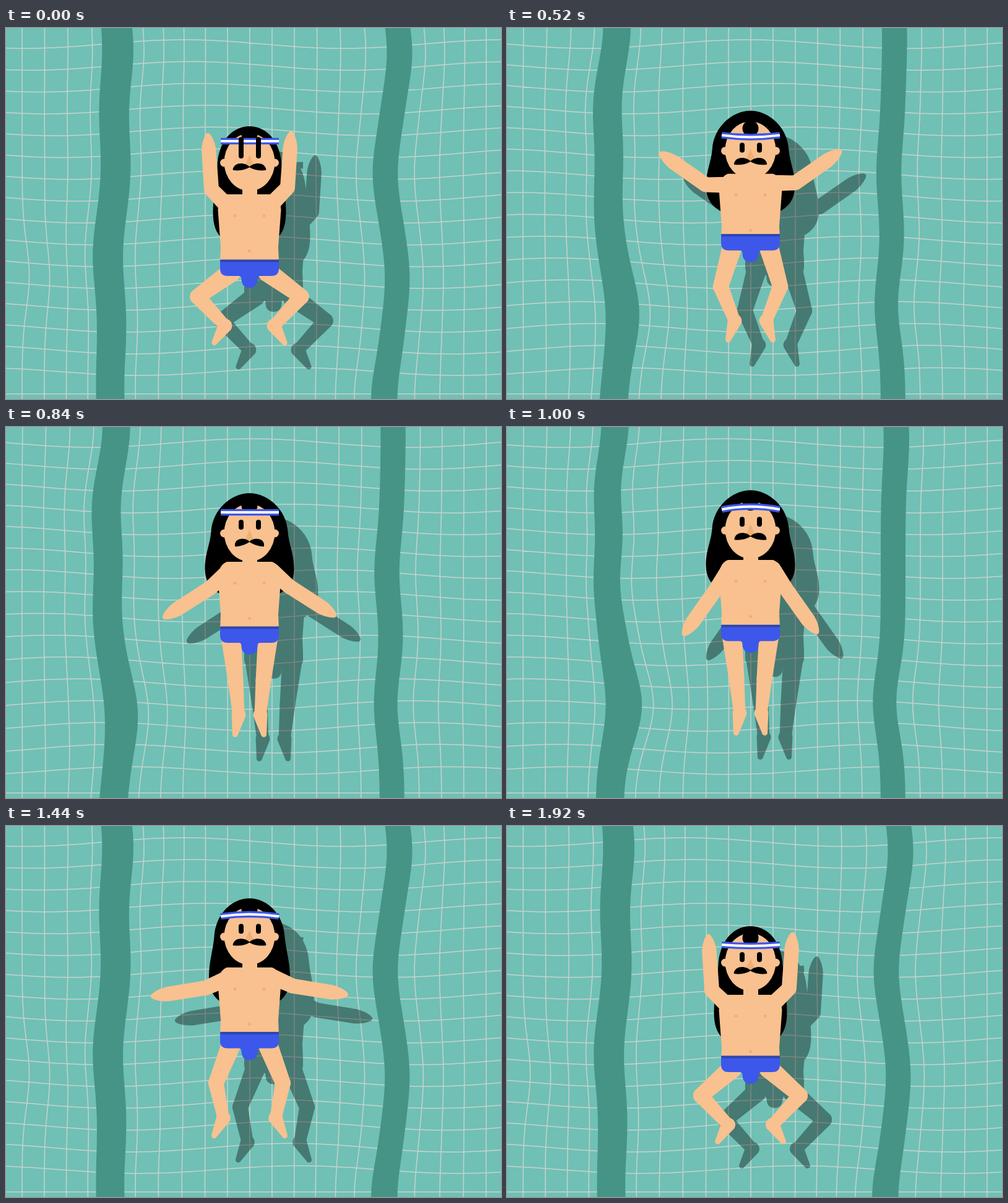
An HTML page with a canvas for the animation above (1.96 s loop, 800 by 600 pixels).

```html
<!DOCTYPE html>
<html>
<head>
<meta charset="utf-8">
<style>
html, body { margin: 0; width: 800px; height: 600px; overflow: hidden; background: #70c0b5; }
canvas { display: block; }
</style>
</head>
<body>
<canvas id="stage" width="800" height="600"></canvas>
<script>
const LOOP = 1960, STEP = 40, MID = 393.5, RAD = Math.PI / 180;
const SKIN = '#f8c18f', DARK_SKIN = '#eeb076', BLUE = '#3d57ea';
const stage = document.getElementById('stage').getContext('2d');
const layer = document.createElement('canvas');
layer.width = 800;
layer.height = 600;
const g = layer.getContext('2d');

// Key poses of the stroke: heights in pixels, limb directions in degrees
const times = [0, 360, 640, 840, 1240, 1640, 1920];
const keys = {
  shoulder: [269, 247, 228, 218, 213, 253, 273],
  waist: [375, 344, 328, 323, 318, 356, 372],
  face: [217, 210, 186, 171, 163, 201, 220],
  nod: [-14, -1, -8, -13, -13, -10, -8],
  spread: [0, 0.9, 1, 1, 1, 0, 0],
  sag: [0, 0, 5, 0, -9, 2, 2],
  arm: [-46, -27, 21, 42, 70, -30, -44],
  fore: [-86, -62, -9, 33, 73, -66, -86],
  thigh: [36, 58, 85, 96, 96, 41, 41],
  shin: [133, 122, 104, 95, 95, 114, 133],
  foot: [58, 66, 75, 80, 80, 45, 58]
};

// Smooth cyclic interpolation without overshoot
function ease(v, t) {
  const n = times.length;
  const at = i => times[(i + n) % n] + LOOP * Math.floor(i / n);
  const val = i => v[(i + n) % n];
  const slope = i => (val(i + 1) - val(i)) / (at(i + 1) - at(i));
  const tangent = i => {
    const a = slope(i - 1), b = slope(i);
    return a * b > 0 ? 2 * a * b / (a + b) : 0;
  };
  let i = n - 1;
  while (at(i) > t) i--;
  const h = at(i + 1) - at(i), s = (t - at(i)) / h, r = 1 - s;
  return val(i) * (1 + 2 * s) * r * r + tangent(i) * h * s * r * r
    + val(i + 1) * s * s * (3 - 2 * s) - tangent(i + 1) * h * s * s * r;
}

// Linear interpolation over [position, value] pairs
function ramp(points, x) {
  const i = Math.max(1, points.findIndex(p => p[0] >= x));
  if (x >= points[points.length - 1][0]) return points[points.length - 1][1];
  const [a, p] = points[i - 1], [b, q] = points[i];
  return p + (q - p) * (x - a) / (b - a);
}

// The water bends sideways around soft swells [x, y, push]; three states blend
const swells = [
  [[190, 35, 10], [175, 225, 6], [160, 370, -9], [210, 580, -5], [30, 400, 12],
    [630, 40, 13], [620, 235, -12], [625, 405, 9], [610, 600, -14]],
  [[130, 0, 6], [195, 100, -12], [200, 250, -13], [210, 450, 23], [200, 600, -7],
    [640, 20, 6], [635, 445, -15]],
  [[150, 0, 10], [170, 140, -12], [170, 310, -10], [195, 470, 14], [150, 550, 9],
    [620, 235, -13], [640, 450, -10]]
];
const flow = [[0, 0], [360, 1], [640, 2], [840, 1.7], [1000, 1], [1120, 0]];

function drawPool(t) {
  const u = ramp(flow, t);
  const bend = (x, y) => swells.reduce((sum, list, i) => {
    const weight = Math.max(0, 1 - Math.abs(u - i));
    if (!weight) return sum;
    return list.reduce((s, [sx, sy, push]) =>
      s + weight * push * Math.exp(-((x - sx) ** 2 + (y - sy) ** 2) / 5600), sum);
  }, x);
  const heave = (x, y) => y + Math.min(1, (592 - y) / 40)
    * (7 * Math.cos((x - 20 - 60 * u - (0.35 + 0.15 * u) * y) / 82) - 1);

  stage.fillStyle = '#70c0b5';
  stage.fillRect(0, 0, 800, 600);
  stage.strokeStyle = '#c6d3cd';
  stage.lineWidth = 1.5;
  stage.beginPath();
  const column = x => {
    for (let y = 0; y <= 600; y += 15) stage[y ? 'lineTo' : 'moveTo'](bend(x, y), y);
  };
  for (let i = 0; i < 4; i++) {
    column(26 + 36 * i);
    column(668 + 36 * i);
  }
  for (let i = 0; i < 11; i++) column(214 + 36 * i);
  for (let i = 0; i < 17; i++)
    for (let x = 0; x <= 800; x += 20) stage[x ? 'lineTo' : 'moveTo'](x, heave(x, 27 + 35.3 * i));
  stage.stroke();

  stage.fillStyle = '#459485';
  for (const [left, right] of [[148, 196], [604, 644]]) {
    stage.beginPath();
    for (let y = 0; y <= 600; y += 10) stage.lineTo(bend(left, y), y);
    for (let y = 600; y >= 0; y -= 10) stage.lineTo(bend(right, y), y);
    stage.fill();
  }
}

function fill(color, d) {
  g.fillStyle = color;
  g.fill(new Path2D(d));
}

function oval(color, x, y, rx, ry = rx) {
  g.fillStyle = color;
  g.beginPath();
  g.ellipse(x, y, rx, ry, 0, 0, 7);
  g.fill();
}

// Tapered segment with round ends; returns its far end
function limb([x, y], r1, degrees, length, r2) {
  const a = degrees * RAD, q = Math.PI / 2;
  const end = [x + length * Math.cos(a), y + length * Math.sin(a)];
  g.fillStyle = SKIN;
  g.beginPath();
  g.arc(x, y, r1, a + q, a - q);
  g.arc(...end, r2, a - q, a + q);
  g.fill();
  return end;
}

// The mirrored side may sit a little lower
function bothSides(draw, drop = 0) {
  draw();
  g.save();
  g.translate(2 * MID, drop);
  g.scale(-1, 1);
  draw();
  g.restore();
}

function drawArm(p) {
  const elbow = limb([430, p.shoulder + 15], 13, p.arm, 36, 12);
  g.save();
  g.translate(...elbow);
  g.rotate(p.fore * RAD);
  fill(SKIN, 'M0-12 L64-12 Q78-11 88-5 Q95 0 88 4 Q78 10 64 11.500 L0 12Z');
  g.restore();
}

function drawLeg(p) {
  const knee = limb([423, p.waist + 20], 16, p.thigh, 67, 12.5);
  // A straight shin dips into the water and looks shorter
  const ankle = limb(knee, 12.5, p.shin, 55 - 14 * Math.cos(p.shin * RAD), 9.5);
  limb(ankle, 11.5, p.foot, 32, 4.5);
}

function drawHair(p) {
  const y = p.face - 58 - 6 * p.spread;
  const a = MID + 52 + 10 * p.spread, b = MID + 59 + 13 * p.spread;
  const low = p.shoulder + 20 - 0.2 * p.arm;
  bothSides(() => fill('#000', `M393 ${y} C${MID + 31} ${y} ${a - 2} ${y + 28} ${a} ${y + 62}
    C${a + 2} ${y + 85} ${b} ${low - 25} ${b} ${low} Q${b} ${low + 30} ${MID + 44} ${low + 42} H393Z`));
}

function drawTorso(p) {
  const s = p.shoulder;
  g.fillStyle = SKIN;
  g.fillRect(382, s - 16, 24, 20);
  bothSides(() => {
    fill(SKIN, `M393 ${s} H430 Q443 ${s + 5} 444.5 ${s + 25} L440 ${s + 85} L441 ${p.waist + 4} H393Z`);
    oval(DARK_SKIN, 417, s + 34.5, 2.5);
  });
  oval(DARK_SKIN, MID, s + 91.5, 2.5);
}

function drawTrunks(y) {
  bothSides(() => fill(BLUE, `M393 ${y} H441 V${y + 14} Q441 ${y + 26} 429 ${y + 26}
    H411 Q406.5 ${y + 26} 406.5 ${y + 31} Q406 ${y + 45} 393 ${y + 45}Z`));
  g.fillStyle = '#2f45ad';
  g.fillRect(346.5, y - 0.5, 94.5, 4);
}

function drawHead(p, t) {
  // Features slide together over the face as the head nods
  const c = p.face, eye = c + p.nod, band = eye - 20;
  const droop = 6 * Math.exp(-(((t - 800) / 170) ** 2));
  const m = eye + 22 + droop;
  bothSides(() => oval(SKIN, 434.5, c + 1, 6.5));
  oval(SKIN, MID, c, 41, 46.5);
  oval('#000', MID, eye - 33 + 2, 13);

  for (const [w, color] of [[10.5, BLUE], [4, '#fff']]) {
    g.strokeStyle = color;
    g.lineWidth = w;
    g.stroke(new Path2D(`M347 ${band} Q${MID} ${band + 2 * p.sag} 441 ${band}`));
  }

  const open = ramp([[260, 1], [360, 0.55], [460, 1]], t);
  const lid = open < 1 ? 0 : 4;
  g.fillStyle = '#000';
  for (const x of [376, 404]) {
    g.beginPath();
    g.roundRect(x, eye + 8 - 16 * open, 8, 16 * open, [lid, lid, 4, 4]);
    g.fill();
  }

  fill(DARK_SKIN, `M393.5 ${m - 20} L400 ${m - 4} Q394 ${m + 4} 387 ${m - 4}Z`);
  const end = 420.5 - droop * 0.6;
  bothSides(() => fill('#000', `M393 ${m} C400 ${m - 8} 418 ${m - 9 + droop * 0.4} ${end} ${m + 4 + droop * 0.4}
    L${end - 1} ${m + 5 + droop * 0.5} Q404 ${m + 7} 393 ${m}Z`));
}

function frame(now) {
  const t = Math.floor(now % LOOP / STEP) * STEP;
  const p = {};
  for (const name in keys) p[name] = ease(keys[name], t);

  g.clearRect(0, 0, 800, 600);
  drawHair(p);
  bothSides(() => drawLeg(p));
  drawTorso(p);
  bothSides(() => drawArm(p), 3);
  drawTrunks(p.waist);
  drawHead(p, t);

  drawPool(t);
  stage.save();
  stage.shadowColor = 'rgba(0,0,0,.37)';
  stage.shadowOffsetX = stage.shadowOffsetY = 39;
  stage.drawImage(layer, 0, 0);
  stage.restore();
}

const start = performance.now();
function tick() {
  frame(performance.now() - start);
  requestAnimationFrame(tick);
}
tick();
</script>
</body>
</html>
```
